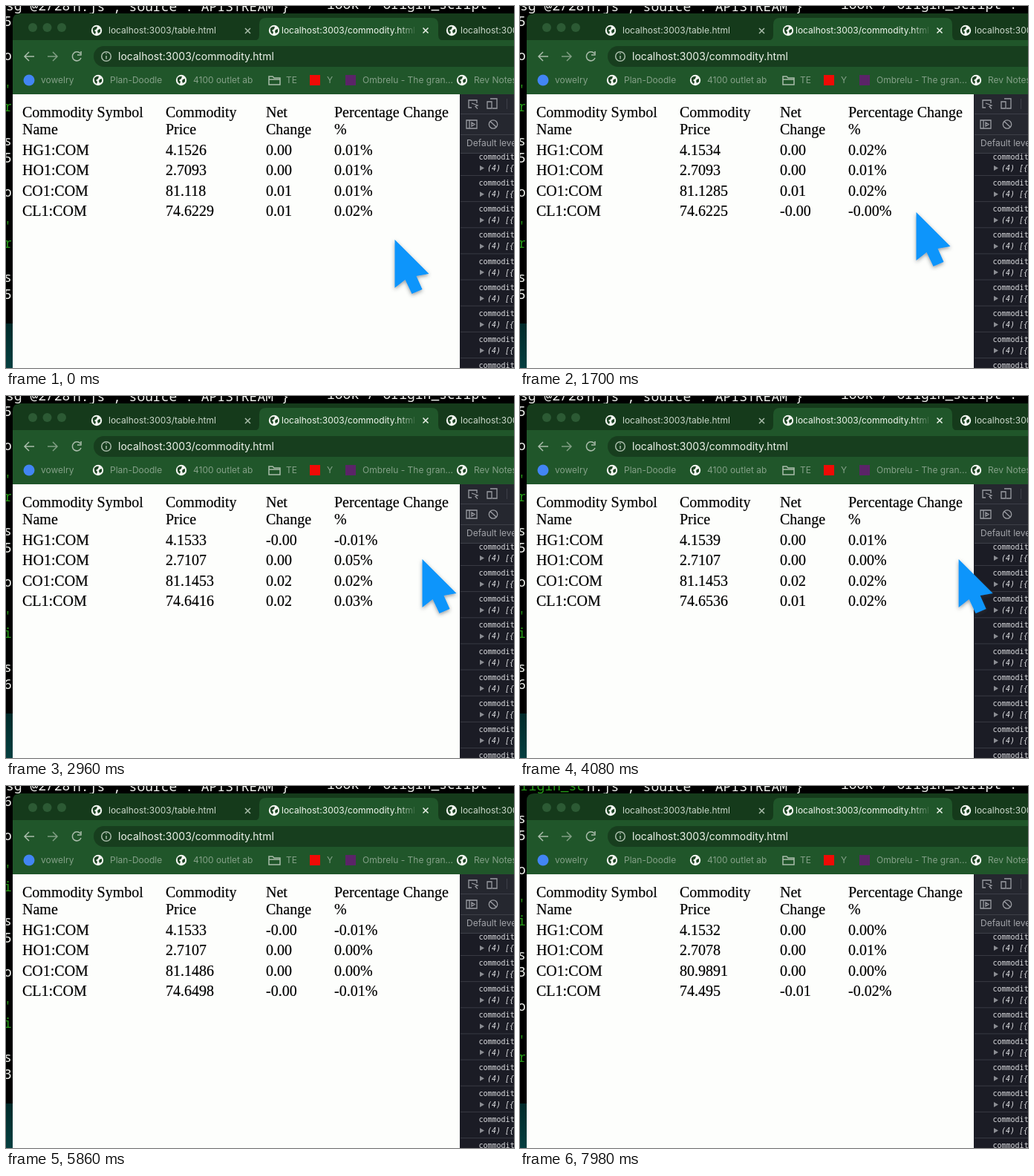
Recreate the animation shown at these times as an HTML page. Size 684 px wide and 488 px high, loop 8000 ms.

```html
<!DOCTYPE html>
<html lang="en">
<head>
<meta charset="utf-8">
<title>Commodity prices</title>
<style>
  html, body { margin: 0; width: 100%; height: 100%; overflow: hidden; background: #000; }
  svg { display: block; }
  text { white-space: pre; }
  .ui { font: 12px Inter, sans-serif; fill: #cbd8cb; }
  .marks { fill: #84a088; }
  .mono { font: 500 18px "Noto Sans Mono", monospace; fill: #f0f2ee; }
  .console { font: 10px "DejaVu Sans Mono", monospace; fill: #dcdde0; }
  .table { font: 20px "Liberation Serif", serif; fill: #000; stroke: #000; stroke-width: .2; }
  .line { fill: none; stroke: #a9bcaa; stroke-width: 1.5; }
  .green { fill: #249a16; }
</style>
</head>
<body>
<svg width="684" height="488" viewBox="0 0 684 488">
  <defs>
    <linearGradient id="fade" gradientUnits="userSpaceOnUse" x1="528" x2="553">
      <stop stop-color="#eef4ec"/><stop offset="1" stop-color="#20562a"/>
    </linearGradient>
    <linearGradient id="glow" x2="0" y2="1">
      <stop stop-color="#002a2a"/><stop offset="1" stop-color="#053f40"/>
    </linearGradient>
    <clipPath id="window"><path d="M9 488V20Q9 10 19 10H684V488Z"/></clipPath>
    <clipPath id="title"><path d="M350 20H551V46H350Z"/></clipPath>
    <filter id="shadow" x="-30%" y="-30%" width="160%" height="160%">
      <feDropShadow dx="0" dy="2" stdDeviation="2.5" flood-color="#33383c" flood-opacity=".5"/>
    </filter>
    <g id="globe">
      <circle r="7.2" fill="#f2f5f0"/>
      <path d="M-5-3Q-2-6 1-5L0-2-3 0-1 2-2 5Q-6 2-5-3M2-1 5-2 5 2 2 4 1 1Z" fill="#1c4423"/>
    </g>
  </defs>

  <rect width="684" height="488"/>
  <rect y="428" width="10" height="60" fill="url(#glow)"/>
  <g class="mono">
    <text id="corner" y="6"></text>
    <text x="90" y="7">n.js","source":"APISTREAM"}</text>
    <text x="432" y="4">look / origin_script :</text>
    <g id="terminal"></g>
  </g>

  <g clip-path="url(#window)">
    <rect x="9" y="10" width="675" height="37" fill="#153a1b"/>
    <path d="M333 47Q341 47 341 39V25Q341 16 350 16H573Q582 16 582 25V39Q582 47 590 47Z" fill="#20562a"/>
    <rect x="9" y="46" width="675" height="73" fill="#20562a"/>
    <rect x="118" y="54" width="580" height="28" rx="14" fill="#173e1e"/>
    <g fill="#2c5a34"><circle cx="36" cy="29" r="6"/><circle cx="55.5" cy="29" r="6"/><circle cx="75" cy="29" r="6"/></g>

    <g class="ui">
      <text x="138" y="37">localhost:3003/table.html</text>
      <text x="371" y="37" clip-path="url(#title)" fill="url(#fade)" style="fill:url(#fade)">localhost:3003/commodity.html</text>
      <text x="612" y="37">localhost:3003/table.html</text>
      <text x="151" y="73" style="font-size:14px;fill:#edf2ea">localhost:3003/commodity.html</text>
    </g>
    <path class="line" d="M322 30l7 7m0-7l-7 7"/>
    <path class="line" style="stroke:#eef4ec" d="M561.500 29.500l7 7m0-7l-7 7"/>
    <path class="line" d="M38 68H25m6-6l-6 6 6 6M100 64a6 6 0 1 0 1 6M101 61v5h-5"/>
    <path class="line" opacity=".7" d="M56 68h13m-6-6l6 6-6 6"/>
    <circle class="line" cx="135" cy="68" r="6.300"/>
    <path class="line" d="M135 67v4.500m0-8v1.600"/>

    <g class="ui marks" id="bookmarks"></g>
    <circle cx="31" cy="100" r="7.500" fill="#4285f4"/>
    <path class="line" d="M354 95h5l2 2h8v9h-15zM354 99h15"/>
    <rect x="409" y="93" width="14" height="14" fill="#f00a05"/>
    <rect x="457" y="93" width="14" height="14" fill="#5b2468"/>
    <g id="globes"></g>

    <rect x="9" y="119" width="603" height="369" fill="#fdfefc"/>
    <g class="table" id="table"></g>

    <rect x="611" y="119" width="73" height="369" fill="#1b1c25"/>
    <rect x="612" y="119" width="72" height="79" fill="#25272f"/>
    <path d="M612 145.500h72M612 173.500h72M612 198.500h72M674.500 125v14" stroke="#3d3f48" fill="none"/>
    <g class="line" style="stroke:#9a9ca2;stroke-width:1.300">
      <path d="M627 137h-4v-10h11v4M627 131l8 3-3 1.500 3 3M652 125h9v13h-6M648 129h6v9h-6z"/>
      <path d="M620 154h14v11h-14zM624 154v11M627 157l4 2.500-4 2.500zM652 155.500l8.500 8"/>
      <circle cx="656" cy="159.500" r="5.700"/>
    </g>
    <text class="ui" x="620" y="189" style="fill:#a3a5aa">Default levels</text>
    <g class="console" id="console"></g>
  </g>

  <path id="pointer" d="M0 0V65L14 54 23 73 37 67 29 49 46 46Z" fill="#0c95fb" filter="url(#shadow)"/>
</svg>

<script>
const LOOP = 8000;
const $ = id => document.getElementById(id);
const text = (x, y, content, attributes = "") => `<text x="${x}" y="${y}" ${attributes}>${content}</text>`;
const range = n => [...Array(n).keys()];

const bookmarks = [
  [47, "vowelry"], [140, "Plan-Doodle"], [252, "4100 outlet ab"], [377, "TE"],
  [432, "Y"], [480, "Ombrelu - The gran..."], [630, "Rev Notes"]
];
$("bookmarks").innerHTML = bookmarks.map(([x, name]) => text(x, 104, name)).join("");
$("globes").innerHTML = [[122, 33], [361, 33], [600, 33], [124, 100], [236, 100], [614, 100]]
  .map(([x, y]) => `<use href="#globe" x="${x}" y="${y}"/>`).join("");

$("console").innerHTML = range(9).map(i => {
  const y = 207 + i * 35.15;
  return text(636.5, y, "commodity") +
    `<path d="M638 ${y + 8}l6 3.500-6 3.500z" fill="#8b8d93"/>` +
    text(648, y + 15, "(4) [{", 'font-style="italic"') +
    `<path d="M612 ${y + 21.5}h72" stroke="#383a43"/>`;
}).join("");

const columns = [22, 215, 350, 442];
const header = ["Commodity Symbol|Name", "Commodity|Price", "Net|Change", "Percentage Change|%"];
const symbols = ["HG1:COM", "HO1:COM", "CO1:COM", "CL1:COM"];

// Each state: start time, "price change percent" per symbol, terminal edge column.
const states = [
  [0, "4.1526 0.00 0.01|2.7093 0.00 0.01|81.118 0.01 0.01|74.6229 0.01 0.02", "5 o 'r s5 o 'r s5"],
  [840, "4.1534 0.00 0.02|2.7093 0.00 0.01|81.1285 0.01 0.02|74.6225 -0.00 -0.00", "5 o 'r s5 o 'r s5"],
  [2500, "4.1533 -0.00 -0.01|2.7107 0.00 0.05|81.1453 0.02 0.02|74.6416 0.02 0.03", "5 o 'r s5 o 'i s6"],
  [3340, "4.1539 0.00 0.01|2.7107 0.00 0.00|81.1453 0.02 0.02|74.6536 0.01 0.02", "5 o 'r s5 o 'i s6"],
  [5020, "4.1533 -0.00 -0.01|2.7107 0.00 0.00|81.1486 0.00 0.00|74.6498 -0.00 -0.01", "6 o 'i s5 o 'i s3"],
  [6700, "4.1527 -0.00 -0.01|2.707 -0.00 -0.13|80.9856 0.01 0.02|74.5036 0.01 0.01", "6 o 'i s5 o 'i s3"],
  [7540, "4.1532 0.00 0.00|2.7078 0.00 0.01|80.9891 0.00 0.00|74.495 -0.01 -0.02", " s5 o 'i s3 o 'r "]
];

const headerMarkup = header.map((cell, c) =>
  cell.split("|").map((part, i) => text(columns[c], 150 + i * 23, part)).join("")).join("");

function showState([, quotes, edge]) {
  const rows = quotes.split("|").map((quote, r) =>
    [symbols[r], ...(quote + "%").split(" ")]
      .map((cell, c) => text(columns[c], 201 + r * 27.4, cell)).join(""));
  $("table").innerHTML = headerMarkup + rows.join("");

  const isGreen = char => "'ri".includes(char);
  $("terminal").innerHTML = [...edge].map((char, i) =>
    text(-3, 27 + i * 23, char, isGreen(char) ? 'class="green"' : "")).join("");

  const scrolled = edge[0] === " ";
  $("corner").textContent = scrolled ? "origin_sc" : "sg @2/28";
  $("corner").setAttribute("x", scrolled ? -10 : 0);
  $("corner").classList.toggle("green", scrolled);
}

// Pointer path: time, x, y.
const path = [
  [0, 523.5, 315], [1700, 533.5, 278], [2960, 560.5, 220],
  [4080, 590.5, 220], [4920, 700, 220], [LOOP, 700, 220]
];

function pointerAt(time) {
  const i = path.findIndex(([end]) => time < end);
  const [t0, x0, y0] = path[i - 1], [t1, x1, y1] = path[i];
  const k = (time - t0) / (t1 - t0);
  return [x0 + (x1 - x0) * k, y0 + (y1 - y0) * k];
}

let current;
function draw(now) {
  const time = now % LOOP;
  const state = states.findLast(([start]) => start <= time);
  if (state !== current) showState(current = state);
  $("pointer").setAttribute("transform", `translate(${pointerAt(time)})`);
}

function tick() {
  draw(performance.now());
  requestAnimationFrame(tick);
}
tick();
</script>
</body>
</html>
```
